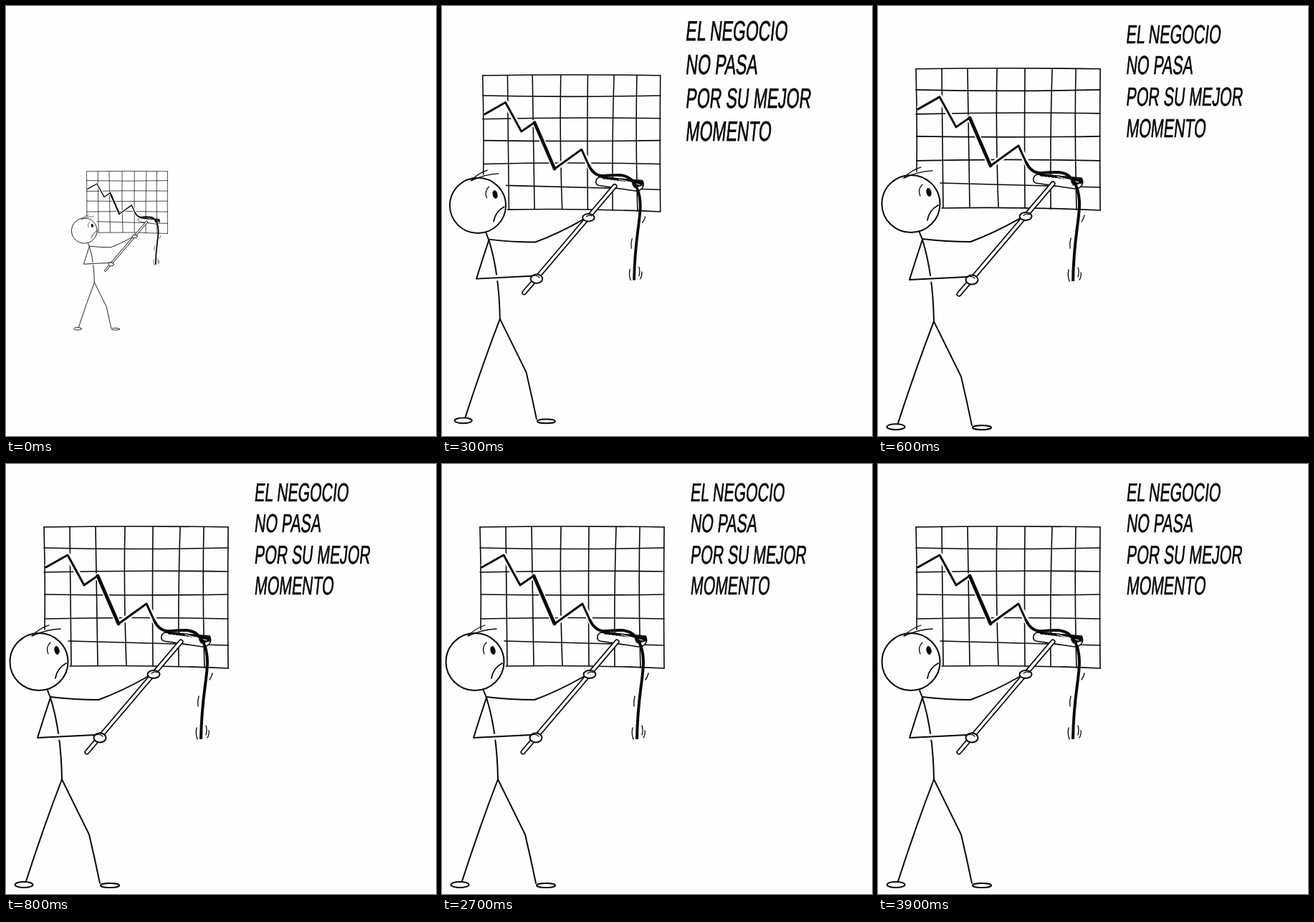
Animation of 600x600 px, one loop 4 s. Source, as an HTML page:

```html
<!DOCTYPE html>
<html lang="es">
<head>
<meta charset="utf-8">
<style>
  html, body { margin: 0; width: 100%; height: 100%; overflow: hidden; background: #fefdff; }
  svg { display: block; width: 100vw; height: 100vh; }
  .ink { fill: none; stroke: #080808; stroke-width: 2; stroke-linecap: round; stroke-linejoin: round; }
  .paper { fill: #fefdff; }
  .halo { stroke: #fefdff; stroke-width: 8; stroke-linecap: butt; }
  .thin { stroke-width: 1.3; }
  .grid { stroke-width: 1.6; }
  text { font: 36px "Liberation Sans", Arial, sans-serif; fill: #080808; stroke: #080808; stroke-width: .7; }
</style>
</head>
<body>
<svg viewBox="0 0 600 600">
  <g id="drawing" class="ink">
    <g class="grid">
      <path d="M53 88Q180 86 310 88M53 117Q180 120 310 117M53 151Q180 148 310 150M54 182Q180 184 310 182M54 216Q180 213 310 216M87 247Q200 250 310 253M89 282Q200 280 310 285"/>
      <path d="M53 88Q55 160 54 231M89 88Q90 180 91 281M125 88Q126 180 128 281M166 88Q164 180 168 281M205 88Q204 180 205 282M243 88Q240 180 241 283M276 88Q274 180 277 284M310 88Q309 190 310 285"/>
    </g>

    <path class="halo" d="M56 144L86 127 109 169 128 156 157 223 196 195 209 222"/>
    <path class="paper" d="M222 235C216 237 215 245 220 247L274 255C284 255 288 247 284 240Z" stroke-width="1.6"/>
    <path d="M226 234L284 241L285 247L272 250L268 242L226 237Z" fill="#080808" stroke-width="1" stroke-dasharray="3 2"/>
    <path d="M250 238L280 246" stroke="#fefdff" stroke-width="1"/>
    <path d="M56 144L86 127 109 169 128 156" stroke-width="3"/>
    <path d="M128 156L157 223" stroke-width="4.8"/>
    <path d="M157 223L196 195 206 217" stroke-width="3"/>
    <path d="M206 217C212 230 220 234 229 233C243 232 257 230 266 237C278 247 281 262 281 278C280 306 273 325 272 384" stroke-width="4" stroke-linecap="butt"/>
    <path class="thin" d="M288 292Q287 297 284 301M269 324Q267 331 268 338M266 368Q264 376 267 384M279 365Q281 371 279 378M283 372Q284 377 281 382"/>

    <path class="paper" d="M58 316L62 326Q77 374 78 440"/>
    <path d="M78 440Q53 505 28 582M78 440L116 517Q124 551 131 585"/>
    <ellipse class="paper" cx="25" cy="587" rx="12.5" ry="4"/>
    <ellipse class="paper" cx="145" cy="588" rx="13" ry="3"/>

    <path d="M244 248L113 402" stroke-width="7.2"/>
    <path d="M244 248L113 402" stroke="#fefdff" stroke-width="3.8"/>

    <path class="halo" d="M68 381L86 380"/>
    <path d="M62 325Q96 329 129 329Q160 318 199 296M62 326Q53 353 44 382L124 378"/>
    <ellipse class="paper" cx="206" cy="293.5" rx="8.5" ry="5.5"/>
    <path class="thin" d="M203 292Q207 289 211 291"/>
    <ellipse class="paper" cx="131" cy="382" rx="8.5" ry="6.5"/>
    <path class="thin" d="M125 378Q131 376 135 380"/>

    <ellipse class="paper" cx="46" cy="276" rx="40.5" ry="40"/>
    <path class="thin" d="M36 240Q47 229 60 225M37 240Q55 231 76 230"/>
    <path class="thin" d="M62 249Q55 256 59 265"/>
    <ellipse cx="71" cy="260" rx="3" ry="5.5" fill="#080808" stroke-width="1" transform="rotate(-12 71 260)"/>
    <path d="M69 299Q71 285 84 278" stroke-width="1.8"/>
  </g>
  <g id="caption"></g>
</svg>
<script>
  const LOOP = 4000, STEP = 100, CAPTION_DELAY = 100;
  const drawing = document.getElementById("drawing");
  const caption = document.getElementById("caption");
  const lines = ["EL NEGOCIO", "NO PASA", "POR SU MEJOR", "MOMENTO"];

  // Narrow, slightly slanted lettering
  caption.innerHTML = lines.map((line, i) =>
    `<text transform="translate(346 ${52 + i * 43.4}) skewX(-6) scale(.59 1)">${line}</text>`
  ).join("");

  // Damped spring around full size
  const spring = ms => {
    const s = ms / 1000, phase = 17.27 * s;
    return 1 + Math.exp(-8.7 * s) * (0.25 * Math.sin(phase) - 0.56 * Math.cos(phase));
  };

  const zoom = (node, scale, x, y) =>
    node.setAttribute("transform", `translate(${x} ${y}) scale(${scale}) translate(${-x} ${-y})`);

  function draw() {
    const time = Math.floor(performance.now() % LOOP / STEP) * STEP;
    zoom(drawing, spring(time), 159, 343);
    zoom(caption, spring(time - CAPTION_DELAY), 429, 104.5);
    caption.setAttribute("visibility", time < CAPTION_DELAY ? "hidden" : "visible");
    requestAnimationFrame(draw);
  }
  draw();
</script>
</body>
</html>
```
